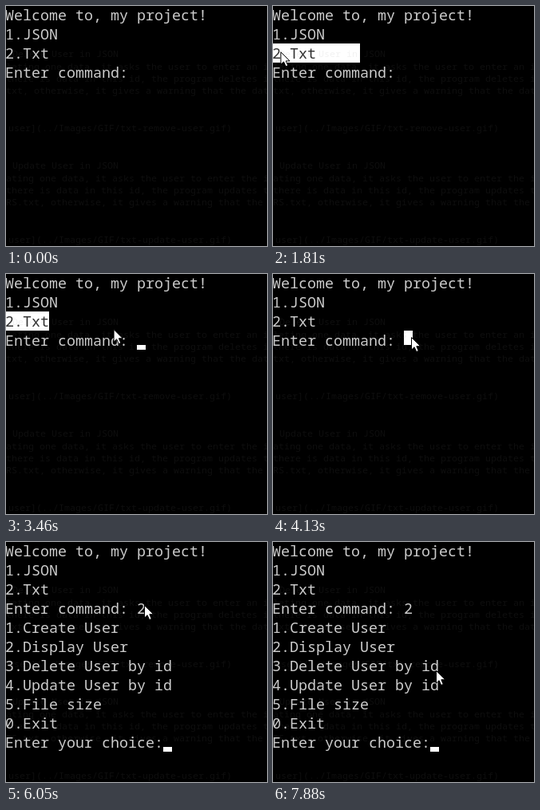
An HTML page with a canvas for the animation above (8000 ms loop, 327 px wide and 301 px high).

```html
<!DOCTYPE html>
<html lang="en">
<head>
<meta charset="utf-8">
<title>Console menu</title>
<style>
  html, body { margin: 0; width: 100%; height: 100%; overflow: hidden; background: #000; }
  canvas { display: block; width: 327px; height: 301px; }
</style>
</head>
<body>
<canvas id="stage" width="327" height="301"></canvas>
<script>
const ctx = document.getElementById('stage').getContext('2d');
const LOOP = 8000, BLINK = 530;
const CELL = 11, ROW = 24, LEFT = -1, TOP = -1;
const ENTER_VIEW = 330, DRAG = 1410, SELECT = 2270, RELEASE = 3020,
  CLICK = 3920, TYPED = 4790, ENTERED = 5320;

const intro = ['Welcome to, my project!', '1.JSON', '2.Txt', 'Enter command:'];
const menu = ['1.Create User', '2.Display User', '3.Delete User by id',
  '4.Update User by id', '5.File size', '0.Exit', 'Enter your choice:'];

// Each move: start, end, then the point it reaches
const origin = [288, 296];
const moves = [
  [ENTER_VIEW, 1070, 109, 60],
  [1340, DRAG, 102, 59],
  [DRAG, 1780, 2, 57],
  [1780, 2140, 48, 60],
  [2470, RELEASE, 1, 58],
  [3170, 3720, 173, 79],
  [6050, 6850, 174, 147],
  [6850, 7270, 190, 161],
  [7600, 7880, 204, 161]
];

const within = (t, from, to) => t >= from && t < to;
const easeOut = k => 1 - (1 - k) ** 2;

// The hand slows down sideways while it drifts evenly up or down
function pointerAt(t) {
  let [x, y] = origin;
  for (const [from, to, endX, endY] of moves) {
    if (t < from) break;
    const k = Math.min(1, (t - from) / (to - from));
    x += (endX - x) * easeOut(k);
    y += (endY - y) * k;
  }
  return [x, y];
}

const isPressed = t => within(t, DRAG, 1800) || within(t, SELECT, RELEASE) || within(t, CLICK, 4130);

function selectionAt(t, x) {
  const column = Math.max(0, Math.floor((x - LEFT) / CELL));
  if (within(t, DRAG + 60, 2000)) return [column, 9, 2];
  if (within(t, SELECT, CLICK)) return [t < RELEASE ? column : 0, 4, 2];
  if (within(t, CLICK + 60, TYPED)) return [15, 15, 3];
  return null;
}

function caretOn(t) {
  const since = t < TYPED ? 880 : TYPED - 200;
  const justPrinted = within(t, ENTERED, ENTERED + BLINK);
  return justPrinted || (t >= since && Math.floor((t - since) / BLINK) % 2 === 0);
}

function caretCell(t) {
  if (t >= ENTERED) return [18, 10];
  return [t < TYPED ? 15 : 16, 3];
}

function drawText(text, x, y, step) {
  [...text].forEach((ch, i) => ctx.fillText(ch, x + i * step, y));
}

// Dim notes showing through the translucent window
function drawBackdrop() {
  ctx.font = '11.667px "Noto Sans Mono", monospace';
  ctx.fillStyle = '#0e0e0e';
  ['Delete', 'Update'].forEach((verb, i) => {
    const y = 64 + i * 140;
    const stem = verb.slice(2, -1) + 'ing';
    const lines = [
      `${stem} one data, it asks the user to enter ${i ? 'the' : 'an'} id`.slice(i ? 1 : 0),
      `there is data in this id, the program ${verb.toLowerCase()}s ${i ? 'the' : 'it'}`,
      'RS.txt, otherwise, it gives a warning that the data'.slice(i ? 0 : 3)
    ];
    drawText(`${verb} User in JSON`, 8, y, 7);
    lines.forEach((line, n) => drawText(line, 0, y + 16 + n * 15, 7));
    drawText(`e user](../Images/GIF/txt-${i ? 'update' : 'remove'}-user.gif)`, -11, y + 93, 7);
  });
}

function drawConsole(t) {
  ctx.fillStyle = '#000';
  ctx.fillRect(0, 0, 327, 301);
  drawBackdrop();
  const lines = t < ENTERED ? [...intro] : [...intro, ...menu];
  if (t >= TYPED) lines[3] += ' 2';
  ctx.font = '18.333px "Noto Sans Mono", monospace';
  ctx.fillStyle = '#ccc';
  lines.forEach((line, row) => drawText(line, LEFT, 18 + row * ROW, CELL));
}

function invert(column, row, cells, height) {
  ctx.globalCompositeOperation = 'difference';
  ctx.fillStyle = '#fff';
  ctx.fillRect(LEFT + column * CELL, TOP + (row + 1) * ROW - height, cells * CELL, height);
  ctx.globalCompositeOperation = 'source-over';
}

const arrow = new Path2D('M0 0V15.6L3.6 12.2L6.2 18L8.8 16.9L6.3 11.2H11.2Z');

function drawPointer(x, y, pressed) {
  if (pressed) {
    ctx.fillStyle = 'rgba(255, 255, 0, .5)';
    ctx.beginPath();
    ctx.arc(x, y, 12, 0, Math.PI * 2);
    ctx.fill();
  }
  ctx.save();
  ctx.translate(x + .5, y + .5);
  ctx.fillStyle = '#fff';
  ctx.strokeStyle = '#000';
  ctx.fill(arrow);
  ctx.stroke(arrow);
  ctx.restore();
}

function draw(t) {
  const [x, y] = pointerAt(t);
  drawConsole(t);
  const selection = selectionAt(t, x);
  if (selection) {
    const [from, to, row] = selection;
    invert(from, row, to - from + 1, ROW);
  }
  if (caretOn(t)) invert(...caretCell(t), 1, 6);
  if (t >= ENTER_VIEW) drawPointer(x, y, isPressed(t));
}

let start;
function tick(now) {
  start ??= now;
  draw((now - start) % LOOP);
  requestAnimationFrame(tick);
}
draw(0);
requestAnimationFrame(tick);
</script>
</body>
</html>
```
